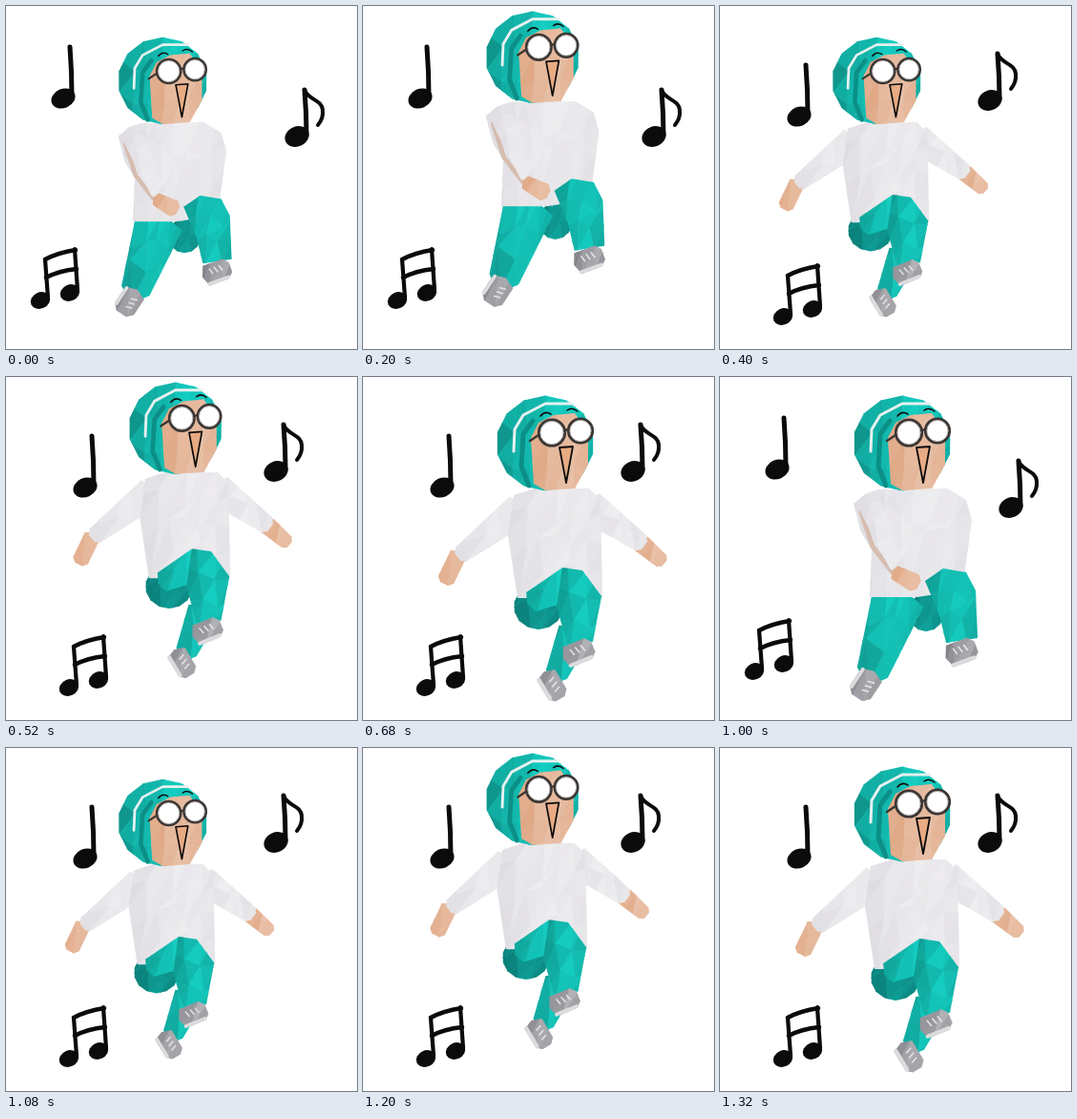
Write an HTML page with a canvas that moves like this. It is 368 px wide and 360 px high and loops after 1.4 s.

```html
<!DOCTYPE html>
<html lang="en">
<head>
<meta charset="utf-8">
<title>Dancing figure</title>
<style>
html, body { margin: 0; width: 100%; height: 100%; overflow: hidden; background: #fff; }
canvas { display: block; width: 368px; height: 360px; }
</style>
</head>
<body>
<canvas id="stage" width="368" height="360"></canvas>
<script>
const ctx = document.getElementById('stage').getContext('2d');
const LOOP = 1400, FIRST_HOLD = 115, STEP = 200 / 3, STEPS = 20, HOP_STEPS = 5;
const INK = '#0b0b0b';

// Hue, saturation, lightness and how far the lightness varies over the facets.
const teal = { h: 176, s: 82, l: 38, range: 9 };
const deepTeal = { h: 177, s: 84, l: 30, range: 7 };
const shirt = { h: 265, s: 8, l: 90, range: 5 };
const skin = { h: 23, s: 60, l: 73, range: 9 };
const shoeGrey = { h: 240, s: 3, l: 60, range: 16 };

const noise = (a, b, c) => {
  const n = Math.sin(a * 12.9898 + b * 78.233 + c * 37.719) * 43758.5453;
  return n - Math.floor(n);
};

function tone({ h, s, l, range }, u, v, jitter) {
  const light = Math.cos((u - 0.6) * 2.6) - 0.5 - v * 0.15 + (jitter - 0.5) * 0.5;
  return `hsl(${h} ${s}% ${l + range * light}%)`;
}

function trace(points) {
  ctx.beginPath();
  points.forEach(([x, y]) => ctx.lineTo(x, y));
  ctx.closePath();
}

const parse = text => text.split(' ').map(pair => pair.split(',').map(Number));

// Fills an outline with a jittered grid of flat triangles, lit from the front right.
function solid(material, points) {
  const xs = points.map(p => p[0]), ys = points.map(p => p[1]);
  const left = Math.min(...xs), top = Math.min(...ys);
  const width = Math.max(...xs) - left, height = Math.max(...ys) - top;
  const cols = Math.ceil(width / 17), rows = Math.ceil(height / 36);
  const seed = left + top;
  const vertex = (i, j) => [
    left + width * (i + (i % cols ? noise(i, j, seed) - 0.5 : 0) * 0.6) / cols,
    top + height * (j + (j % rows ? noise(j, i, seed + 5) - 0.5 : 0) * 0.8) / rows
  ];
  ctx.save();
  trace(points);
  ctx.clip();
  ctx.lineWidth = 0.8;
  for (let i = 0; i < cols; i++) for (let j = 0; j < rows; j++) {
    const a = vertex(i, j), b = vertex(i + 1, j), c = vertex(i + 1, j + 1), d = vertex(i, j + 1);
    [[a, b, d], [b, c, d]].forEach((triangle, k) => {
      ctx.fillStyle = ctx.strokeStyle =
        tone(material, (i + 0.35 + k * 0.3) / cols, (j + 0.5) / rows, noise(i, j, seed + k));
      trace(triangle);
      ctx.fill();
      ctx.stroke();
    });
  }
  ctx.restore();
}

function gem(material, x, y, rx, ry, sides = 14) {
  solid(material, Array.from({ length: sides }, (_, i) => {
    const angle = (i + 0.5) / sides * Math.PI * 2;
    return [x + rx * Math.cos(angle), y + ry * Math.sin(angle)];
  }));
}

// A tapered block from one joint to the next, with chamfered ends.
function limb(material, ax, ay, aw, bx, by, bw) {
  const length = Math.hypot(bx - ax, by - ay);
  const dx = (bx - ax) / length, dy = (by - ay) / length;
  const corner = (x, y, along, across) => [x + dx * along - dy * across, y + dy * along + dx * across];
  solid(material, [
    corner(ax, ay, 0, -aw / 2), corner(bx, by, 0, -bw / 2),
    corner(bx, by, bw / 4, -bw / 4), corner(bx, by, bw / 4, bw / 4),
    corner(bx, by, 0, bw / 2), corner(ax, ay, 0, aw / 2), corner(ax, ay, -aw / 5, 0)
  ]);
}

function line(d, width, color = INK) {
  ctx.strokeStyle = color;
  ctx.lineWidth = width;
  ctx.stroke(new Path2D(d));
}

function shoe(ax, ay, bx, by, width) {
  limb(shoeGrey, ax, ay, width, bx, by, width);
  ctx.save();
  ctx.translate(ax, ay);
  ctx.rotate(Math.atan2(by - ay, bx - ax));
  const length = Math.hypot(bx - ax, by - ay);
  line(`M0 ${width / 2 - 2} H${length}`, 4, '#dcdcde');
  for (let i = 1; i < 4; i++) line(`M${length * i / 4} ${-width / 4} l2 6`, 1.6, '#e4e4e6');
  ctx.restore();
}

function noteHead(x, y, rx, ry) {
  ctx.fillStyle = INK;
  ctx.beginPath();
  ctx.ellipse(x, y, rx, ry, -0.42, 0, Math.PI * 2);
  ctx.fill();
}

function at(x, y, draw) {
  ctx.save();
  ctx.translate(x, y);
  draw();
  ctx.restore();
}

function quarterNote() {
  line('M67 43 Q69 68 69 95', 5);
  noteHead(60, 97, 13, 10);
}

function eighthNote() {
  line('M313 88 Q315 112 315 135', 5);
  line('M313 88 C317 99 331 98 332 109 Q333 118 327 125', 4);
  noteHead(305, 137, 13, 10.5);
}

function beamedNotes() {
  line('M41 266 L44 306 M72 255 L75 298', 4.2);
  line('M41 266 Q54 259 73 256 M42 285 Q55 278 74 276', 4.5);
  noteHead(36, 309, 10.5, 8.5);
  noteHead(67, 301, 10.5, 8.5);
}

function notes(spread) {
  at(spread ? 23 : 0, spread ? 19 : 0, quarterNote);
  at(spread ? -22 : 0, spread ? -38 : 0, eighthNote);
  at(spread ? 30 : 0, spread ? 17 : 0, beamedNotes);
}

function lens(x, y, r) {
  const circle = (radius, width, color) => {
    ctx.beginPath();
    ctx.arc(x, y, radius, 0, Math.PI * 2);
    ctx.fillStyle = '#fff';
    ctx.fill();
    ctx.lineWidth = width;
    ctx.strokeStyle = color;
    ctx.stroke();
  };
  circle(r, 3.2, '#3a3634');
  circle(r - 1.4, 1, '#b5aeaa');
}

function head() {
  gem(teal, 191, 69.5, 51.5, 50);
  line('M220 28 L191 28 L168 40 L159 55 L158 78', 3, '#e6f1f0');
  line('M178 46 L168 60 L166 94 L174 114', 5, '#0b8f87');
  solid(skin, parse('176,64 184,48 200,40 222,38 236,58 236,92 222,117 191,119 179,112'));
  line('M186 41 Q191 35 197 39 M214 35 Q219 31 225 36', 1.6);
  ctx.fillStyle = '#e8ab83';
  ctx.fill(new Path2D('M206 74 L220 73 L213 111 Z'));
  line('M206 74 L220 73 L213 111 Z', 1.8);
  line('M184 61 L175 67 M211 57 Q214 54 217 56', 2.4, '#3a3634');
  lens(198, 58.5, 13.5);
  lens(228, 56.5, 12.5);
}

function spreadBody() {
  limb(teal, 222, 268, 36, 203, 312, 24);
  gem(deepTeal, 184, 241, 26, 24);
  shoe(192, 313, 204, 333, 22);
  limb(skin, 100, 186, 18, 87, 213, 18);
  limb(skin, 292, 175, 20, 313, 193, 16);
  limb(shirt, 164, 139, 34, 103, 186, 19);
  limb(shirt, 238, 136, 34, 291, 174, 20);
  solid(shirt, parse('158,124 180,117 237,117 249,129 251,232 162,232 152,166'));
  limb(teal, 176, 236, 22, 216, 217, 36);
  solid(teal, parse('209,200 230,203 250,230 241,278 214,280 203,241'));
  shoe(214, 294, 236, 285, 23);
}

function foldedBody() {
  gem(deepTeal, 216, 247, 19, 20);
  limb(teal, 187, 232, 56, 160, 310, 34);
  shoe(159, 313, 147, 331, 26);
  solid(shirt, parse('140,133 152,123 166,118 238,117 258,129 264,150 254,224 206,231 157,231 159,181 148,163'));
  line('M148 142 L160 178 L180 204', 5, '#d6bdb0');
  limb(shirt, 158, 136, 24, 186, 198, 17);
  limb(skin, 183, 205, 15, 204, 216, 20);
  solid(teal, parse('215,214 234,201 258,205 268,224 270,274 237,279 230,250'));
  shoe(241, 293, 263, 285, 24);
}

function figure(spread, progress) {
  const mix = (a, b) => a + (b - a) * progress;
  const hop = Math.sin(Math.PI * progress);
  const scale = mix(0.915, 1);
  ctx.save();
  ctx.translate(mix(-10.5, 0), mix(15, 0) - 20.8 * hop);
  ctx.scale(scale, scale + 0.01 * hop);
  (spread ? spreadBody : foldedBody)();
  head();
  ctx.restore();
}

function draw(time) {
  const t = time % LOOP;
  const step = Math.min(STEPS - 1, Math.max(0, Math.floor((t - FIRST_HOLD) / STEP) + 1));
  const spread = Math.floor(step / HOP_STEPS) % 2 === 1;
  ctx.fillStyle = '#fff';
  ctx.fillRect(0, 0, 368, 360);
  ctx.lineCap = ctx.lineJoin = 'round';
  notes(spread);
  figure(spread, (step % HOP_STEPS) / (HOP_STEPS - 1));
}

const start = performance.now();
function tick() {
  draw(performance.now() - start);
  requestAnimationFrame(tick);
}
tick();
</script>
</body>
</html>
```
